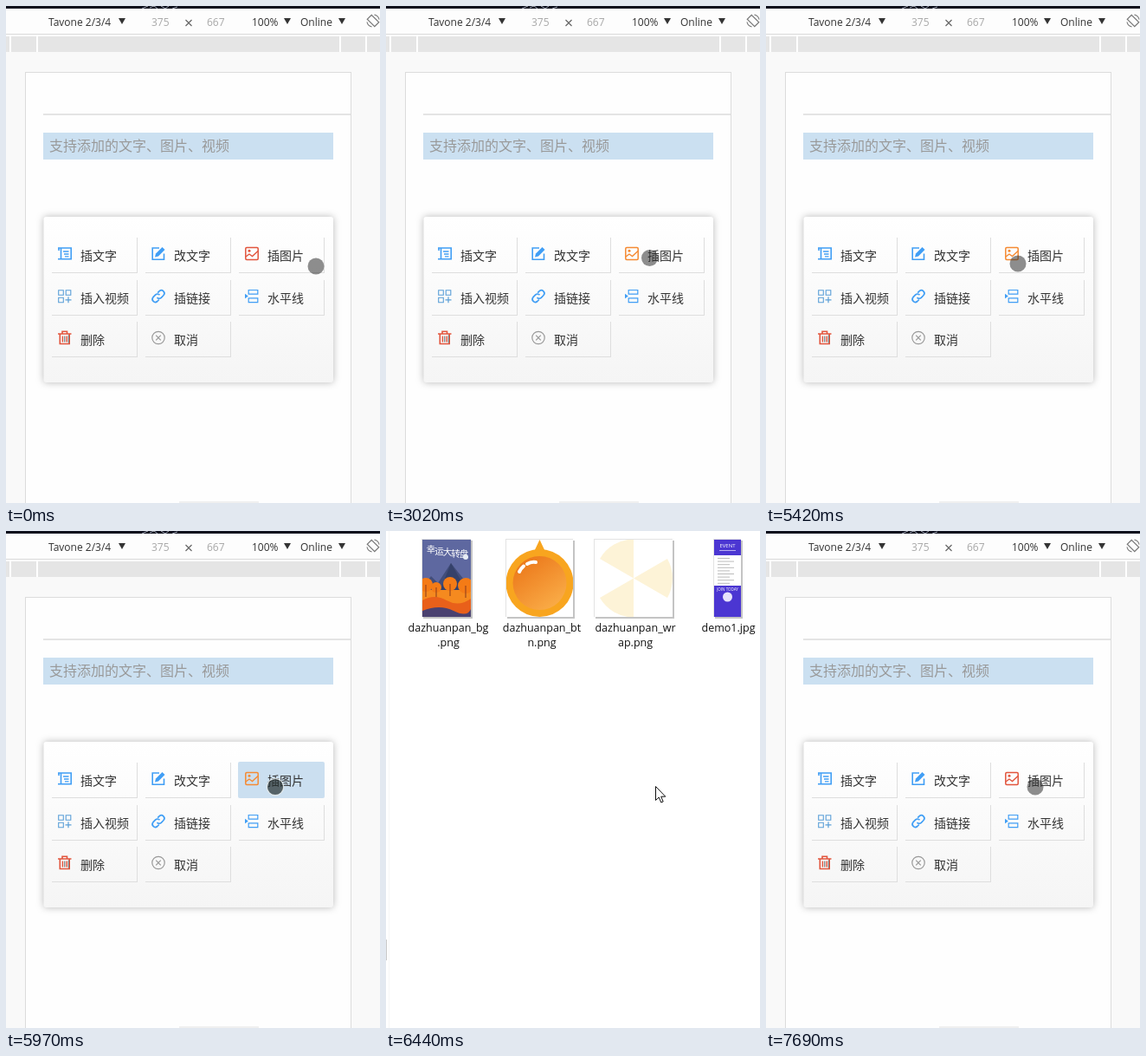
These frames come from a looping animation (432 px wide and 573 px high, 7.98 s). An HTML page with a canvas:

```html
<!DOCTYPE html>
<html lang="zh">
<head>
<meta charset="utf-8">
<title>Insert menu</title>
<style>
  html, body { margin: 0; width: 100%; height: 100%; overflow: hidden; background: #fff; }
  canvas { display: block; width: 432px; height: 573px; }
</style>
</head>
<body>
<canvas id="stage" width="432" height="573"></canvas>
<script>
const ctx = document.getElementById('stage').getContext('2d');
const W = 432, H = 573, LOOP = 7980;
const CJK = '"Noto Sans CJK SC", "Noto Sans CJK", sans-serif';
const LATIN = '"Open Sans", "Noto Sans", sans-serif';
const BLUE = '#409ef5', RED = '#e2553d', ORANGE = '#f58a33', TINT = '#cbdff0';

// Pointer moves: start, end, number of steps, target x, target y
const START = [358, 300];
const MOVES = [
  [60, 140, 2, 349, 286], [990, 1160, 3, 328, 287], [2000, 2170, 3, 311, 290],
  [3020, 3110, 2, 298, 291], [3710, 3710, 1, 301, 289], [3790, 4030, 4, 279, 292],
  [5420, 5420, 1, 291, 297], [5505, 5590, 2, 311, 295]
];
const TAPS = [[1470, 1530], [3340, 3480], [5900, 5980]];

function rect(x, y, w, h, color) {
  ctx.fillStyle = color;
  ctx.fillRect(x, y, w, h);
}

function text(str, x, y, size, color, family = CJK, align = 'left') {
  ctx.font = `${size}px ${family}`;
  ctx.textAlign = align;
  ctx.fillStyle = color;
  ctx.fillText(str, x, y);
}

function disc(x, y, r, color) {
  ctx.fillStyle = color;
  ctx.beginPath();
  ctx.arc(x, y, r, 0, Math.PI * 2);
  ctx.fill();
}

function fillPath(d, color) {
  ctx.fillStyle = color;
  ctx.fill(new Path2D(d));
}

function strokePath(d, color, width = 1.5) {
  ctx.strokeStyle = color;
  ctx.lineWidth = width;
  ctx.stroke(new Path2D(d));
}

function at(x, y, draw) {
  ctx.save();
  ctx.translate(x, y);
  draw();
  ctx.restore();
}

// Icons live in a 16 x 16 box
const icons = {
  text() {
    strokePath('M0 1.5H15.2V14.2H2M0 14.2H7M3.5 2V14M1 1V4.5', BLUE, 1.6);
    strokePath('M6 5.5H12.5M7 8.5H12.5M8 11.3H12.5', BLUE, 1.3);
  },
  edit() {
    strokePath('M9 1.5H1.2V14.8H14.5V8', BLUE, 1.6);
    fillPath('M4 12L5 8L12.5 0.5L15.5 3.5L8 11Z', BLUE);
  },
  picture(color) {
    strokePath('M2 1H14Q15.2 1 15.2 2.2V13.8Q15.2 15 14 15H2Q.8 15 .8 13.8V2.2Q.8 1 2 1Z', color, 1.5);
    strokePath('M1 11.5L5 8.5L8.5 11L15 5', color, 1.4);
    disc(5, 4.8, 1.5, color);
  },
  video() {
    strokePath('M.7 1.2H6.3V6.8H.7ZM9.2 1.2H14.8V6.8H9.2ZM.7 9.7H6.3V15.3H.7Z', '#5a9fd8', 1.1);
    strokePath('M12 8.8V15.8M8.5 12.3H15.5', '#5a9fd8', 1.2);
  },
  link() {
    strokePath('M6.5 9.6A3.4 3.4 0 0 0 11.3 9.8L14 7A3.4 3.4 0 0 0 9.2 2.2L7.2 4.2', BLUE, 1.7);
    strokePath('M9.5 6.6A3.4 3.4 0 0 0 4.7 6.4L2 9.2A3.4 3.4 0 0 0 6.8 14L8.8 12', BLUE, 1.7);
  },
  line() {
    fillPath('M0 5.2L3.8 8L0 10.8Z', BLUE);
    strokePath('M4.2 1V5.6H14.8V1ZM4.2 15.2V10.4H14.8V15.2Z', BLUE, 1.2);
    strokePath('M5 8H16', '#fff', 1);
  },
  trash() {
    strokePath('M0 3.5H15.5M5 3V.8H10.5V3M2.3 4V15H13.2V4', RED, 1.6);
    strokePath('M5.4 6V13M10.2 6V13', RED, 1.4);
    strokePath('M7.8 6V13M12.4 5V14', '#777', 1.2);
  },
  cancel() {
    ctx.beginPath();
    ctx.arc(8, 8, 7.2, 0, Math.PI * 2);
    ctx.strokeStyle = '#999';
    ctx.lineWidth = 1.2;
    ctx.stroke();
    strokePath('M5.2 5.2L10.8 10.8M10.8 5.2L5.2 10.8', '#999', 1.2);
  }
};

const BUTTONS = [
  ['插文字', 'text'], ['改文字', 'edit'], ['插图片', 'picture'],
  ['插入视频', 'video'], ['插链接', 'link'], ['水平线', 'line'],
  ['删除', 'trash'], ['取消', 'cancel']
];

function toolbar() {
  rect(0, 0, W, 33, '#fdfdfd');
  rect(0, 0, W, 3, '#0a0d1c');
  strokePath('M157 3L164 0M166 2L171 0L175 3M179 0L184 3L188 0M192 3L198 1', '#a9adb9', 1);
  text('Tavone 2/3/4', 49, 23, 12, '#333', LATIN);
  text('375', 168, 23, 12, '#a8a8a8', LATIN);
  strokePath('M207.5 16L214.5 23M214.5 16L207.5 23', '#666', 1.2);
  text('667', 232, 23, 12, '#a8a8a8', LATIN);
  text('100%', 284, 23, 12, '#333', LATIN);
  text('Online', 340, 23, 12, '#333', LATIN);
  for (const x of [130, 321, 384]) fillPath(`M${x} 14H${x + 8}L${x + 4} 21Z`, '#333');
  at(424, 17, () => {
    ctx.rotate(-Math.PI / 4);
    strokePath('M-3.5 -6H3.5V6H-3.5Z', '#777', 1.2);
    strokePath('M-6 -4A7.5 7.5 0 0 0 -6 4M6 -4A7.5 7.5 0 0 1 6 4', '#777', 1);
  });
  rect(0, 32, W, 1, '#d9d9d9');
  rect(0, 33, W, 20, '#fff');
  rect(0, 35, W, 18, '#e5e5e5');
  for (const x of [4, 35, 385, 415]) rect(x, 34, 2, 19, '#fff');
}

function panel(hot, tint) {
  const bg = ctx.createLinearGradient(0, 243, 0, 434);
  bg.addColorStop(0, '#fff');
  bg.addColorStop(1, '#f5f5f5');
  ctx.save();
  ctx.shadowColor = 'rgba(0,0,0,.28)';
  ctx.shadowBlur = 9;
  ctx.fillStyle = bg;
  ctx.beginPath();
  ctx.roundRect(43.5, 243, 334.5, 191, 3);
  ctx.fill();
  ctx.restore();

  BUTTONS.forEach(([label, icon], i) => {
    const x = 52 + i % 3 * 108, y = 266 + Math.round(Math.floor(i / 3) * 48.6);
    const active = icon === 'picture';
    if (active && tint) {
      ctx.fillStyle = TINT;
      ctx.beginPath();
      ctx.roundRect(x, y, 100, 42, 2);
      ctx.fill();
    } else {
      rect(x + 99, y + 1, 1, 41, '#dedede');
      rect(x + 1, y + 41, 99, 1, '#dedede');
    }
    at(x + 8, y + 11.5, () => icons[icon](hot ? ORANGE : RED));
    text(label, x + 34, y + 26.5, 14, '#333');
  });
}

function page(hot, tint) {
  rect(0, 0, W, H, '#f9f9f9');
  toolbar();
  rect(22, 76, 377, H, '#dcdcdc');
  rect(23, 77, 375, H, '#fefefe');
  rect(43, 124, 355, 2, '#e4e4e4');
  rect(43, 146, 335, 31, '#cbe0f1');
  text('支持添加的文字、图片、视频', 50, 167, 16, '#999');
  panel(hot, tint);
  rect(200, 571, 92, 2, '#f0f0f0');
}

function thumb(x, y, w, h, draw) {
  rect(x + 1, y + 1, w + 1, h + 1, '#c4c4c4');
  rect(x - 1, y - 1, w + 1, h + 1, '#e3e3e3');
  rect(x, y, w, h, '#fff');
  at(x, y, () => {
    ctx.beginPath();
    ctx.rect(0, 0, w, h);
    ctx.clip();
    draw();
  });
}

function autumn() {
  rect(0, 0, 56, 89, '#5e68a0');
  fillPath('M0 56L10 42L18 50L33 27L56 56V70H0Z', '#424d7a');
  fillPath('M20 60L33 27L52 60Z', '#35416a');
  rect(0, 58, 56, 31, '#f58a1f');
  for (const [x, y, r] of [[4, 52, 8], [16, 55, 6], [32, 51, 8], [50, 53, 9]]) {
    disc(x, y, r, '#f47b16');
    rect(x - .5, y, 1, 14, '#8a3b1c');
  }
  fillPath('M0 70Q14 62 28 70T56 68V89H0Z', '#e9601a');
  fillPath('M0 82Q20 74 36 82T56 80V89H0Z', '#4a4170');
  [...'幸运大转盘'].forEach((c, i) =>
    text(c, 10 + i * 9.5, 15 + i * 1.7 - (i === 4 ? 2 : 0), 10.5, '#fff', CJK, 'center'));
  disc(50, 20, 3, '#e8edf5');
}

function knob() {
  fillPath('M38.5 0L47 18H30Z', '#f8a51f');
  disc(38.5, 50, 39, '#f8a51f');
  const g = ctx.createLinearGradient(20, 25, 58, 78);
  g.addColorStop(0, '#ec7a1c');
  g.addColorStop(1, '#faad48');
  disc(38.5, 50, 31, g);
  ctx.lineCap = 'round';
  strokePath('M15 37Q17 33 20 30.5M24 28Q29 25 34 26', '#fff', 4);
}

function wheel() {
  for (const a of [-150, -30, 90]) {
    ctx.fillStyle = '#fdf3d7';
    ctx.beginPath();
    ctx.moveTo(45, 44.5);
    ctx.arc(45, 44.5, 45, a * Math.PI / 180, (a + 60) * Math.PI / 180);
    ctx.fill();
  }
}

function poster() {
  rect(0, 0, 31, 18, '#4b36d2');
  text('EVENT', 15.5, 9, 6, '#fff', LATIN, 'center');
  rect(6, 12, 19, 1, '#b9b0f2');
  for (let i = 0; i < 9; i++) rect(4, 21 + i * 3.6, 14 + i * 5 % 10, 1, '#bbb');
  rect(0, 53, 31, 37, '#4b36d2');
  text('JOIN TODAY', 15.5, 59, 4.5, '#fff', LATIN, 'center');
  disc(15.5, 66, 5.5, '#e6e3fb');
}

function files() {
  rect(0, 0, W, H, '#fff');
  rect(3, 0, 1, H, '#f6f6f6');
  rect(0, 471, 1, 24, '#c8c8c8');
  thumb(42, 10, 56, 89, autumn);
  thumb(139, 10, 77, 89, knob);
  thumb(241, 10, 90, 89, wheel);
  thumb(379, 10, 31, 89, poster);
  const label = (str, x, y) => text(str, x, y, 12.5, '#111', LATIN, 'center');
  label('dazhuanpan_bg', 72, 116);
  label('.png', 72, 133);
  label('dazhuanpan_bt', 180, 116);
  label('n.png', 180, 133);
  label('dazhuanpan_wr', 288, 116);
  label('ap.png', 288, 133);
  label('demo1.jpg', 395.5, 116);
}

// Half-open file dialog: veil over the page plus its lower bar
function opening(veil) {
  rect(0, 0, W, H, `rgba(255,255,255,${veil})`);
  rect(0, 464, W, H - 464, `rgba(225,225,225,${.65 * (1 - veil)})`);
  rect(66, 464, 100, 15, '#fff');
  rect(174, 464, 104, 19, '#fff');
  rect(174, 423, 104, 25, '#fdfdfd');
  strokePath('M278 423.5H174.5V447.5H278', '#78b4e4', 1);
  rect(177, 429, 1, 15, '#444');
}

function arrow() {
  at(311, 294, () => {
    const d = 'M.5 .5V16.5L4.2 13L6.8 19L9.2 18L6.7 12.2H11.8Z';
    fillPath(d, '#fff');
    strokePath(d, '#111', 1);
  });
}

function touch([x, y], pressed) {
  disc(x, y, 9.5, pressed ? 'rgba(35,45,45,.7)' : 'rgba(50,50,50,.55)');
  if (!pressed) return;
  ctx.beginPath();
  ctx.arc(x, y, 9.7, 0, Math.PI * 2);
  ctx.strokeStyle = 'rgba(235,240,240,.85)';
  ctx.lineWidth = 1.2;
  ctx.stroke();
}

function pointer(t) {
  let pos = START;
  for (const [from, to, n, x, y] of MOVES) {
    if (t < from) break;
    const gap = n > 1 ? (to - from) / (n - 1) : 1;
    const k = Math.min(n, Math.floor((t - from) / gap) + 1) / n;
    pos = [pos[0] + (x - pos[0]) * k, pos[1] + (y - pos[1]) * k];
  }
  return pos;
}

function draw(t) {
  const tapped = TAPS.some(([a, b]) => t >= a && t < b);
  const isArrow = t >= 6050 && t < 7610;
  if (t >= 6440 && t < 7530) {
    files();
  } else {
    page(t >= 1470 && t < 6050, tapped);
    if (t >= 6200 && t < 6360) opening(t < 6280 ? .55 : .82);
    else if (t >= 6360 && t < 6440) rect(0, 0, W, H, 'rgba(255,255,255,.97)');
    else if (t >= 7530 && t < 7690) rect(0, 0, W, H, `rgba(255,255,255,${t < 7610 ? .6 : .2})`);
  }
  if (isArrow) arrow();
  else touch(pointer(t), tapped);
}

const begin = performance.now();
function tick() {
  draw((performance.now() - begin) % LOOP);
  requestAnimationFrame(tick);
}
tick();
</script>
</body>
</html>
```
